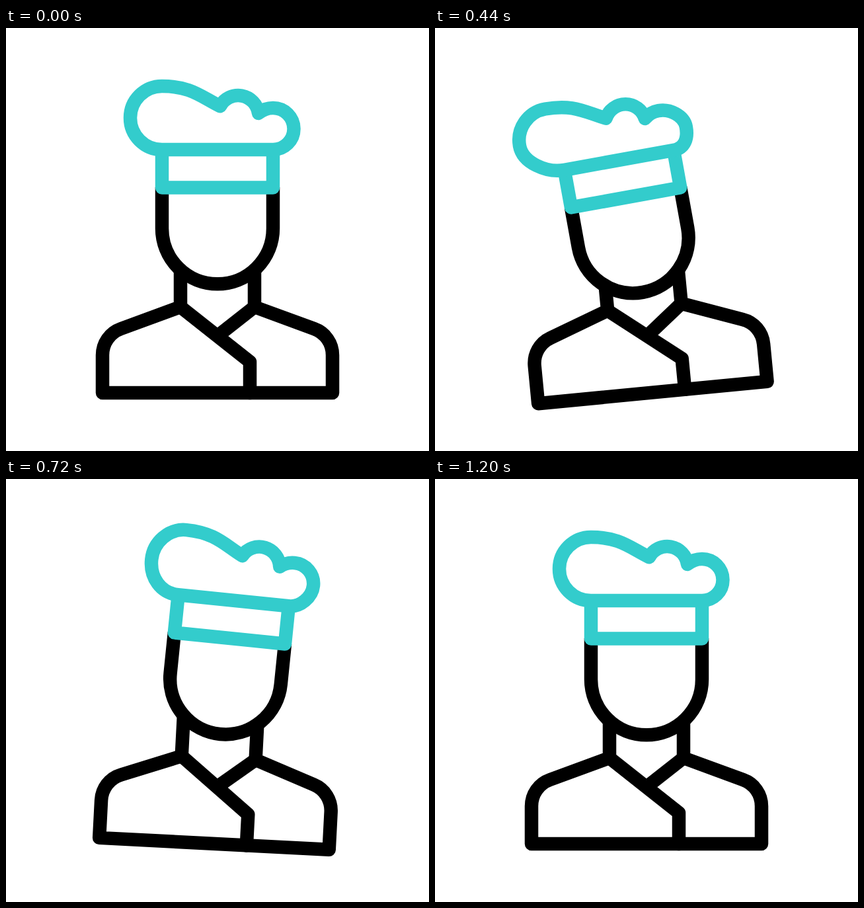
Write an HTML page that moves like this. It is 640 px wide and 640 px high and loops after 1.48 s.

```html
<!DOCTYPE html>
<html lang="en">
<head>
<meta charset="utf-8">
<title>Chef</title>
<style>
  html, body { margin: 0; width: 100%; height: 100%; overflow: hidden; background: #fff; }
  svg { display: block; width: 100%; height: 100%; }
  path { fill: none; stroke: #000; stroke-width: 20.5; stroke-linecap: round; stroke-linejoin: round; }
  .face { fill: #fff; stroke-linecap: butt; }
  .hat path { stroke: #3cc; }
  #puff { fill: #fff; }
</style>
</head>
<body>
<svg viewBox="0 0 640 640">
  <g id="body">
    <path d="M264 356V422L174 455C157 461 146 477 146 495V552H494V495C494 477 483 461 466 455L376 422V356"/>
    <path d="M264 422L369 505V552M376 422L320 466"/>
    <g id="head">
      <path class="face" d="M236 241V303.3A84 84 0 0 0 404 303.3V241"/>
      <g class="hat">
        <path d="M236 184V241.5H404V184"/>
        <path id="puff"/>
      </g>
    </g>
  </g>
</svg>
<script>
  const LOOP = 1480, STEP = 40;
  const el = id => document.getElementById(id);
  const body = el('body'), head = el('head'), puff = el('puff');

  // keys: [time, value], eased between neighbours
  const sway = [[40, 0], [360, -6], [400, -6], [677, 3], [700, 3], [995, 0]];
  const nod  = [[160, 0], [482, -5], [792, 4.1], [1120, 0]];
  const drop = [[160, 0], [484, 13], [797, -4], [1120, 0]];
  const lean = [[190, 0], [515, -14], [860, 11.6], [1200, 0]];
  const rise = [[540, 0], [860, -4.8], [1200, 0]];

  function at(keys, t) {
    if (t <= keys[0][0]) return keys[0][1];
    for (let i = 1; i < keys.length; i++) {
      const [t0, a] = keys[i - 1], [t1, b] = keys[i];
      if (t < t1) {
        const u = (t - t0) / (t1 - t0);
        return a + (b - a) * u * u * (3 - 2 * u);
      }
    }
    return keys[keys.length - 1][1];
  }

  // The base of the puff stays on the band while the upper part drags behind.
  function puffPath(dx, dy) {
    const p = (x, y) => `${x + dx} ${y + dy} `;
    const side = dx < 0 ? dx * 0.55 : dx;
    const r = (x, y) => `${x + side} ${y + dy} `;
    const l = 188 + dx;
    return `M404 184H236C209.5 184 ${l} 162.5 ${l} ${136 + dy * 0.4}` +
      `C${l} ${109.5 + dy * 0.4} ` + p(209.5, 88) + p(236, 88) +
      'C' + p(280, 88) + p(295, 104) + p(324, 118.3) +
      'A31 31 0 0 1 ' + p(382, 129) +
      'C' + p(388, 124) + p(395.5, 121) + p(404, 121) +
      'C' + p(421.4, 121) + r(435.5, 135) + r(435.5, 152.5) +
      'C' + r(435.5, 170) + '421.4 184 404 184Z';
  }

  function draw(now) {
    const t = Math.floor((now % LOOP) / STEP) * STEP;
    body.setAttribute('transform', `rotate(${at(sway, t)} 320 454)`);
    head.setAttribute('transform', `translate(0 ${at(drop, t)}) rotate(${at(nod, t)} 320 390)`);
    puff.setAttribute('d', puffPath(at(lean, t), at(rise, t)));
  }

  const start = performance.now();
  function tick() {
    draw(performance.now() - start);
    requestAnimationFrame(tick);
  }
  tick();
</script>
</body>
</html>
```
